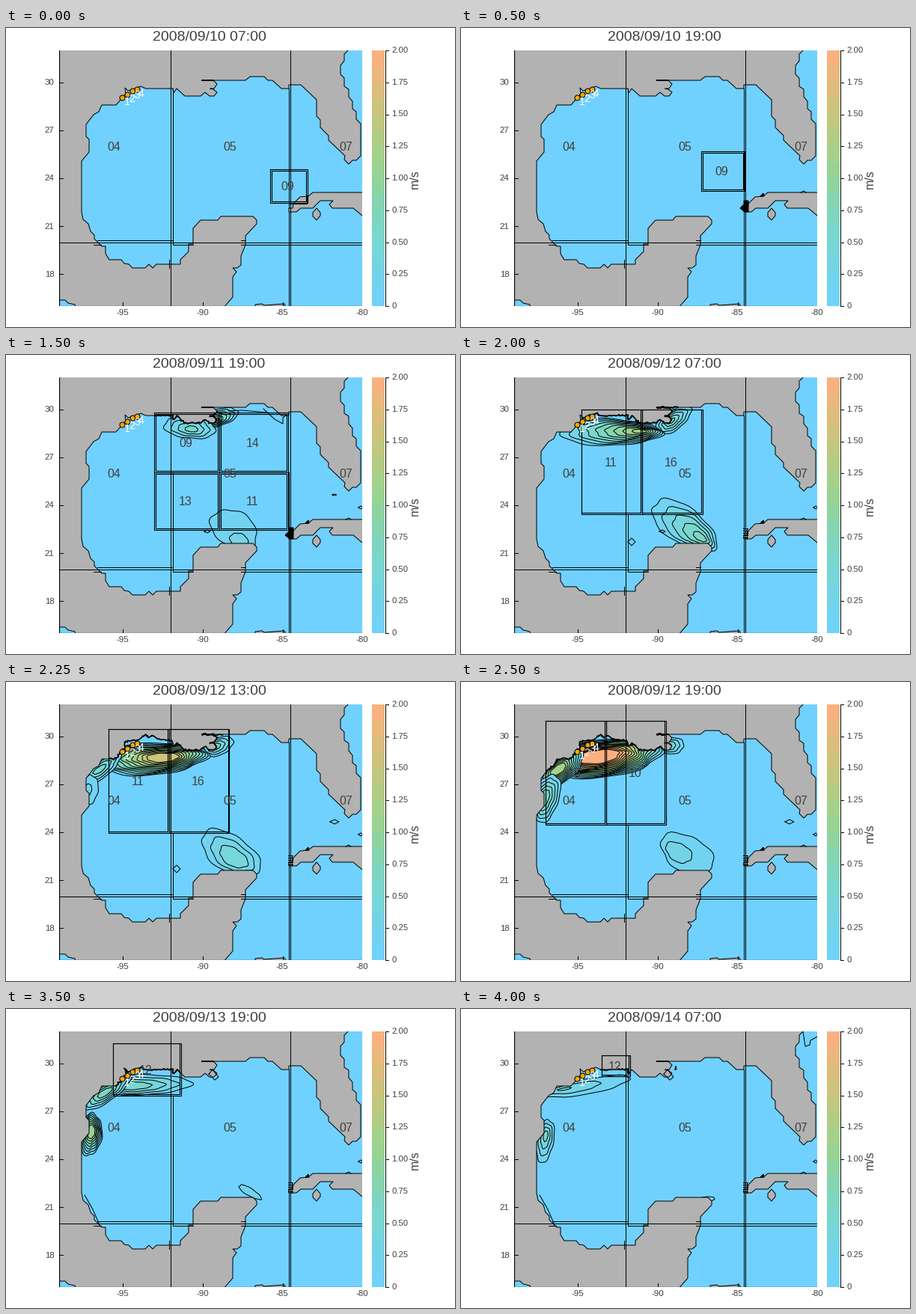
Write a matplotlib script that moves like this. It is 600x400 px and loops after 4.25 s.

```python
import numpy as np
import matplotlib.pyplot as plt
from matplotlib.animation import FuncAnimation
from matplotlib.colors import LinearSegmentedColormap
from matplotlib.patches import Polygon, Rectangle

W, H, FRAMES, STEP = 600, 400, 17, 0.125
L, R, T, B = 71, 476.5, 30, 372
PT = 0.72
INK, LAND = "#404040", "#b2b2b2"
plt.rcParams["font.family"] = "Liberation Sans"
speed = LinearSegmentedColormap.from_list("speed", [
    "#70d1ff", "#73d3ec", "#78d7d4", "#80d6bb", "#92d498",
    "#a9d086", "#c6c67b", "#e2bb7b", "#ffb080"])

# Coastlines, in stage pixels
FLORIDA = [(457, 25), (457, 30), (452, 35), (452, 44), (447, 50), (447, 62), (452, 67),
           (452, 78), (458, 82), (458, 92), (463, 98), (463, 108), (468, 112), (468, 122),
           (474, 128), (474, 171), (468, 177), (463, 177), (458, 182), (452, 176),
           (453, 171), (431, 150), (431, 144), (420, 133), (420, 123),
           (415, 118), (415, 96), (394, 76)]
NORTH = [(378, 76), (378, 81), (368, 81), (356, 70), (350, 70), (345, 65),
         (326, 65), (320, 70), (261, 70), (277, 70), (282, 75), (278, 81), (272, 81),
         (277, 82), (282, 86), (278, 91), (272, 91), (266, 86), (260, 91), (239, 91),
         (228, 81), (224, 87)]
BAY = [(223, 81), (187, 81), (180, 78), (170, 82), (163, 84), (159, 80), (160, 88), (155, 94)]
FLOODED = [(222, 79), (203, 76), (195, 71), (191, 74), (186, 70), (178, 77),
           (158, 80), (159, 88), (153, 94)]
WEST = [(147, 103), (128, 103), (124, 112), (117, 116), (107, 129), (107, 145), (111, 149),
        (111, 166), (101, 178), (101, 246), (103, 256), (110, 262), (113, 272), (118, 277),
        (118, 282), (128, 292), (133, 292), (133, 302), (138, 310)]
SOUTH = [(154, 310), (158, 315), (164, 316), (169, 321), (186, 321), (191, 316), (196, 321),
         (201, 316), (213, 316), (233, 316), (233, 310), (244, 299),
         (244, 289), (250, 289), (250, 268), (260, 257), (283, 257), (287, 252), (330, 252),
         (335, 257), (335, 262), (320, 278), (320, 290), (314, 305), (314, 317), (309, 321),
         (303, 321), (308, 326), (303, 333), (303, 360), (290, 375)]
PACIFIC = [(94, 378), (92, 370), (83, 368), (79, 364), (60, 364), (60, 25)]
CUBA = [(378, 246), (378, 241), (383, 241), (384, 235), (393, 226), (404, 225), (410, 220),
        (485, 220), (485, 252), (476, 251), (464, 241), (436, 241), (432, 236), (437, 231),
        (420, 231), (410, 241), (394, 241), (388, 246)]
ISLE = [(410, 247), (415, 241), (420, 247), (420, 251), (415, 257), (410, 252)]
CAY = [(333, 376), (333, 370), (342, 369), (345, 371), (372, 369), (375, 376)]

# Refined boxes: x0, y0, x1, y1, label
BOXES = {
    0: [(353, 189, 403, 234, "09")],
    4: [(289, 141, 355, 202, "10")],
    6: [(198, 77, 285, 157, "09"), (285, 77, 377, 157, "14"),
        (198, 157, 285, 234, "13"), (285, 157, 377, 234, "11")],
    7: [(180, 73, 262, 223, "11"), (262, 73, 348, 223, "16")],
    8: [(161, 73, 242, 213, "11"), (242, 73, 323, 213, "16")],
    10: [(113, 52, 194, 191, "15"), (194, 52, 274, 191, "10")],
    12: [(98, 141, 136, 175, "10"), (98, 25, 242, 142, "")],
    13: [(120, 38, 238, 129, "12")],
    16: [(188, 62, 226, 90, "12")],
}

# Currents: frame, top speed, x, y, rx, ry, tilt, core dx, core dy, core scale
YUCATAN = [
    (3, .25, 329, 249, 10, 6, 40, 2, 1, .3),
    (4, .375, 326, 236, 25, 7, 62, 5, 13, .2),
    (6, .25, 305, 234, 34, 24, 35, 7, 15, .4),
    (8, .625, 298, 228, 50, 24, 35, 21, 15, .2),
    (10, .25, 302, 230, 38, 24, 30, -11, -2, .5),
    (12, .125, 322, 236, 25, 7, 62, 5, 13, .2),
    (16, .125, 330, 254, 9, 3, 0, 0, 0, .5),
]
DELTA = [
    (6, .75, 285, 84, 26, 11, -20, -5, 3, .2),
    (8, .625, 284, 87, 27, 13, -35, -3, 1, .2),
    (10, .5, 281, 85, 17, 11, 0, -4, 0, .25),
]
SHELF = [
    (5, .25, 262, 93, 20, 9, 10, 0, 3, .3),
    (6, .5, 246, 96, 34, 16, 5, 2, 3, .25),
    (8, 1.125, 198, 103, 69, 18, 1, 40, -1, .14),
    (10, 2, 187, 102, 86, 25, -7, -5, -2, .35),
    (12, .75, 207, 99, 58, 17, 6, -8, 0, .4),
    (16, .375, 165, 104, 62, 10, -10, -27, 3, .15),
]
COAST = [
    (9, .5, 125, 117, 34, 12, -35, 0, 0, .3),
    (10, 1.125, 130, 117, 40, 18, -35, 0, 0, .3),
    (12, 1.625, 136, 116, 46, 17, -37, -3, -1, .4),
    (14, .625, 132, 112, 38, 13, -32, 0, 0, .3),
]
LOBE = [
    (9, .25, 112, 144, 11, 20, 5, -2, 0, .4),
    (10, .625, 115, 155, 16, 33, 15, -3, 0, .35),
    (12, 1.625, 115, 160, 17, 28, 5, 0, -2, .3),
    (16, .5, 112, 176, 12, 29, 8, 1, -6, .25),
]
CURRENTS = [YUCATAN, DELTA, SHELF, COAST, LOBE]

# Small outlines: first frame, last frame, points
OUTLINES = [
    (3, 4, [(360, 76), (360, 84), (366, 89), (370, 84), (369, 80)]),
    (5, 7, [(344, 72), (359, 86), (370, 92), (370, 84), (376, 79)]),
    (5, 7, [(297, 75), (315, 74), (350, 77)]),
    (11, 16, [(105, 249), (116, 268), (125, 289)]),
    (12, 16, [(271, 87), (276, 81), (284, 91), (279, 95), (271, 87)]),
    (15, 16, [(286, 81), (288, 81), (287, 76), (286, 81)]),
    (15, 16, [(457, 30), (460, 50), (466, 48), (467, 42), (476, 37)]),
]
# Islets: first frame, last frame, x, y, half width, half height
ISLETS = [(6, 7, 439, 187, 3, 1), (9, 11, 439, 187, 6, 3), (6, 16, 474, 204, 3, 2),
          (6, 8, 269, 236, 4, 2), (7, 9, 228, 250, 5, 5)]


def bracket(keys, i):
    """Neighbouring keys around i and the fraction between them."""
    lo = max(k for k in keys if k <= i)
    hi = min(k for k in keys if k >= i)
    return lo, hi, (i - lo) / (hi - lo) if hi > lo else 0


def lerp(a, b, u):
    return np.asarray(a, float) * (1 - u) + np.asarray(b, float) * u


def boxes_at(i):
    lo, hi, u = bracket(BOXES, i)
    a, b = BOXES[lo], BOXES[hi]
    if len(a) != len(b):
        return a
    return [(*lerp(p[:4], q[:4], u), p[4]) for p, q in zip(a, b)]


def line(pts, lw=1.0, z=4):
    x, y = zip(*pts)
    sea.plot(x, y, color="k", lw=lw * PT, zorder=z, solid_joinstyle="miter")


def label(ax, x, y, s, size, color=INK, **kw):
    kw = {"ha": "center", "va": "center", **kw}
    return ax.text(x, y, s, fontsize=size * PT, color=color, **kw)


def shape(pts, fill, z):
    sea.add_patch(Polygon(pts, closed=True, fc=fill, ec="k", lw=PT, zorder=z))


def draw_current(track, i):
    """Nested contours that shrink from an outer ellipse to its core."""
    if not track[0][0] <= i <= track[-1][0]:
        return
    keys = {k[0]: k[1:] for k in track}
    lo, hi, u = bracket(keys, i)
    top, x, y, rx, ry, tilt, dx, dy, core = lerp(keys[lo], keys[hi], u)
    a = np.linspace(0, 2 * np.pi, 40, endpoint=False)
    c, s = np.cos(np.radians(tilt)), np.sin(np.radians(tilt))
    for level in np.arange(STEP, top + 1e-6, STEP):
        w = (level - STEP) / max(top - STEP, STEP)
        k = 1 + (core - 1) * w
        k = k * (1 + .05 * np.sin(3 * a + i) + .04 * np.sin(7 * a + 5 * level))
        px, py = k * rx * np.cos(a), k * ry * np.sin(a)
        pts = np.c_[x + dx * w + c * px - s * py, y + dy * w + s * px + c * py]
        shape(pts, speed((level + STEP / 2) / 2), 2)


def draw_fine_coast(coast, boxes):
    """Ragged heavy shoreline wherever a refined box covers it."""
    p = np.array(coast, float)
    s = np.r_[0, np.cumsum(np.hypot(*np.diff(p, axis=0).T))]
    t = np.arange(0, s[-1], 2.5)
    x, y = np.interp(t, s, p[:, 0]), np.interp(t, s, p[:, 1])
    inside = np.zeros(len(t), bool)
    for x0, y0, x1, y1, _ in boxes:
        inside |= (x > x0) & (x < min(x1, 290)) & (y > y0 - 4) & (y < y1)
    jit = np.random.default_rng(4).uniform(-1.6, 1.6, (2, len(t)))
    sea.plot(np.where(inside, x + jit[0], np.nan), y + jit[1], color="k", lw=1.5 * PT, zorder=4)


def draw_grid(boxes):
    def below(x, top):
        return max([top] + [b[3] for b in boxes if b[0] - 2 <= x <= b[2] + 2 and b[1] < 100])

    for x, y0, y1 in [(220, T, B), (380, T, B), (223, below(223, 81), 289.5),
                      (378, below(378, 81), 234), (378, 246, B), (218, 310, 321)]:
        line([(x, y0), (x, y1)])
    for y, x0, x1 in [(286.5, L, R), (284, 122, 223), (289.5, 117, 127),
                      (289.5, 223, 250), (289.5, 314, R), (284, 314, 320)]:
        line([(x0, y), (x1, y)])


def draw_cape(i):
    if i == 0:
        line([(378, 241), (378, 235), (402, 235), (402, 224)])
    elif i < 7:
        shape([(373, 241), (378, 236), (378, 231), (384, 231), (384, 246), (379, 246)], "k", 5)
    else:
        for y in range(232, 247, 3):
            line([(377, y), (383, y)])
        for x in (378, 382):
            line([(x, 232), (x, 246)])
    if i:
        shape([(400, 225), (404, 221), (405, 225)], "k", 5)
        line([(454, 220), (458, 218), (461, 220)])


def draw(i):
    sea.clear()
    sea.set(xlim=(L, R), ylim=(B, T))
    sea.axis("off")
    sea.add_patch(Rectangle((L, T), R - L, B - T, fc=speed(0), zorder=0))
    boxes = boxes_at(i)
    for track in CURRENTS:
        draw_current(track, i)
    bay = FLOODED if 9 <= i <= 13 else BAY
    shape(FLORIDA + NORTH + bay + WEST + SOUTH + PACIFIC, LAND, 3)
    for pts in (CUBA, ISLE, CAY):
        shape(pts, LAND, 3)
    if i >= 6:
        draw_fine_coast(NORTH + bay + WEST, boxes)
    draw_grid(boxes)
    draw_cape(i)
    for first, last, pts in OUTLINES:
        if first <= i <= last:
            line(pts)
    for first, last, x, y, w, h in ISLETS:
        if first <= i <= last:
            line([(x - w, y), (x, y - h), (x + w, y), (x, y + h), (x - w, y)])
    for x0, y0, x1, y1, name in boxes:
        pad = 1.6 if i < 8 else 0
        for x, y, e in ((x0, y0, 0), (x0 + pad, y0 + pad, 1.6)):
            line([(x, y), (x1 - e, y), (x1 - e, y1 - e), (x, y1 - e), (x, y)], 1.1)
        label(sea, (x0 + x1) / 2 - 1.5, (y0 + y1) / 2 + 1, name, 16, zorder=6)
    for x, name in ((144, "04"), (299, "05"), (454, "07")):
        label(sea, x, 159, name, 16, zorder=6)
    for n, (x, y) in enumerate([(155.5, 93), (162.5, 88.5), (169.5, 84), (175, 82)], 1):
        sea.plot(x, y, "o", ms=7 * PT, mfc="#ffa500", mec="k", mew=PT, zorder=7)
        label(sea, x + 6, y + 6, str(n), 14, "white", zorder=8)
    hours = 7 + 6 * i
    title.set_text(f"2008/09/{10 + hours // 24} {hours % 24:02d}:00")
    # axis lines and inner ticks
    line([(L + .5, T), (L + .5, B - .5), (R, B - .5)], 1.2, 9)
    for y in LAT.values():
        line([(L, y), (L + 5, y)], 1, 9)
    for x in LON.values():
        line([(x, B), (x, B - 5)], 1, 9)


LAT = {d: T + (32 - d) * (B - T) / 16 for d in range(18, 31, 3)}
LON = {d: L + (d + 99) * (R - L) / 19 for d in range(-95, -79, 5)}

fig = plt.figure(figsize=(W / 100, H / 100), dpi=100, facecolor="white")
page = fig.add_axes([0, 0, 1, 1])
page.set(xlim=(0, W), ylim=(H, 0))
page.axis("off")
sea = fig.add_axes([L / W, 1 - B / H, (R - L) / W, (B - T) / H])

title = label(page, 271.5, 12.5, "", 19.5)
for d, y in LAT.items():
    label(page, 64.5, y + .5, str(d), 11.5, ha="right")
for d, x in LON.items():
    label(page, x - .5, 381.5, str(d), 11.5)
band = (B - T) / 16
for k in range(16):
    page.add_patch(Rectangle((488.5, B - (k + 1) * band), 17.5, band, lw=0,
                             fc=speed((k + .5) / 16), antialiased=False))
page.plot([506.5, 506.5], [T, B], color="k", lw=PT)
for k in range(9):
    y = B - k * (B - T) / 8
    page.plot([506.5, 511], [y, y], color="k", lw=PT)
    label(page, 515, y, f"{k / 4:.2f}" if k else "0", 11.3, ha="left")
label(page, 546, 202, "m/s", 16, rotation=90)

anim = FuncAnimation(fig, draw, frames=FRAMES, init_func=lambda: draw(0),
                     interval=250, repeat=True, repeat_delay=0)
plt.show()
```
